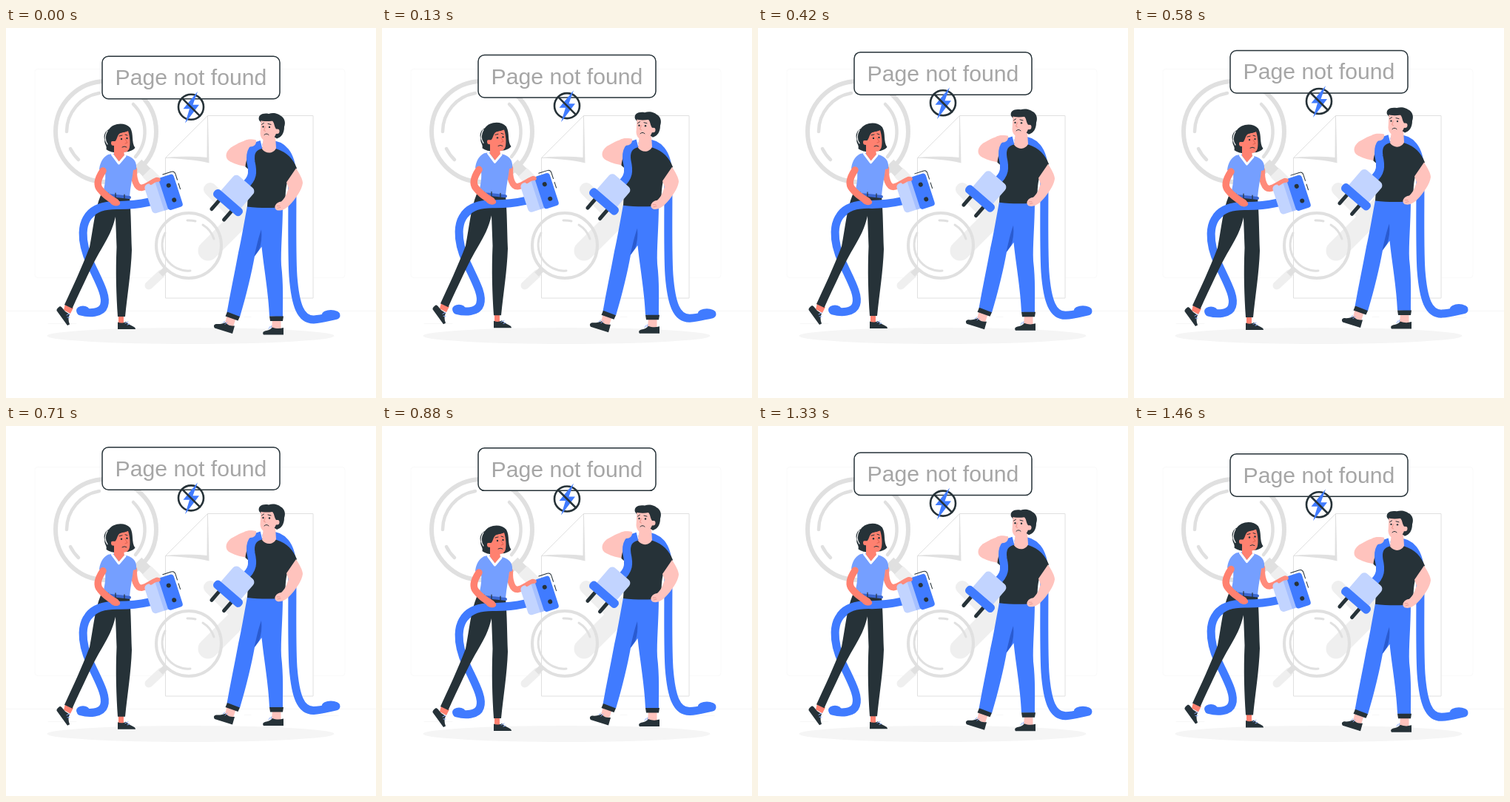
An HTML page for the animation above (1500 ms loop, 500 by 500 pixels).

```html
<!DOCTYPE html>
<html lang="en">
<head>
<meta charset="utf-8">
<title>Page not found</title>
<style>
  html, body { margin: 0; height: 100%; overflow: hidden; background: #fff; }
  svg { display: block; width: 100%; height: 100%; }
  .line { fill: none; stroke-linecap: round; stroke-linejoin: round; }
  .blue { fill: #407bff; }
  .dark { fill: #263238; }
  .cable { stroke: #407bff; stroke-width: 11; }
  .ink { stroke: #263238; }
  .grey { stroke: #e0e0e0; }
  .pale { stroke: #efefef; }
  .tan { fill: #ff8170; }
  .pink { fill: #ffc3bd; }
</style>
</head>
<body>
<svg viewBox="0 0 500 500">
  <!-- backdrop -->
  <g class="line">
    <rect x="39" y="55.5" width="419" height="282" rx="4" stroke="#fafafa"/>
    <path d="M0 382.5H500" stroke="#f6f6f6"/>
    <path d="M416 391.5h33M57 399.5h38M322 390.5h9" stroke="#f7f7f7"/>
    <path class="pale" stroke-width="17" d="M192 197L240 245"/>
    <path class="grey" stroke-width="15" stroke-linecap="butt" d="M178 183L190 195"/>
    <g class="grey">
      <circle cx="135" cy="140" r="68" stroke-width="6"/>
      <path stroke-width="4.500" d="M82 140A53 53 0 0 1 126 88M87 163A53 53 0 0 0 98 178M172 103A52 52 0 0 1 175 174"/>
    </g>
  </g>
  <path class="grey" fill="#fff" d="M272.500 118.500H415V365H215.500V175.500Z"/>
  <path fill="#e0e0e0" d="M273 122L274.500 182.500C258 178 236 177 215.500 175.500Z"/>
  <path class="grey" fill="#fff" d="M272.500 118.500L272 175.500C252 173.500 234 174 215.500 175.500Z"/>
  <g class="line pale">
    <path stroke-width="18" d="M276 218L308 250"/>
    <path stroke-width="27" d="M273 301L335 239"/>
    <path stroke-width="11" d="M210 332L193 348"/>
  </g>
  <g class="line grey">
    <path stroke-width="8" stroke-linecap="butt" d="M217 325L209 333"/>
    <circle cx="247" cy="294" r="44" stroke-width="4"/>
    <path stroke-width="3" d="M215 277A35 35 0 0 0 249 328M245 260A35 35 0 0 1 256 261M266 266A35 35 0 0 1 281 285"/>
  </g>
  <ellipse cx="249.500" cy="416" rx="194" ry="11" fill="#f5f5f5"/>

  <g id="woman">
    <path class="line cable" d="M122 246C97 258 102 292 114 318C125 342 137 362 132.500 375C129 386 112 386 101 383"/>
    <ellipse class="blue" cx="104" cy="381.500" rx="9" ry="6"/>
    <path class="tan" d="M80 373L91 378L87 386L78 381ZM152 388H159V400H152Z"/>
    <path class="dark" d="M73 376C70 378 68 380 68.500 382L83 402L86 400.500C84 395 84 391 86 387L80 383C77 380 76 377 73 376Z"/>
    <path class="dark" d="M151 397.500V407H175C175 403 168 403 162 397C158 399 154 399 151 397.500Z"/>
    <path class="line" stroke="#8fb0ff" d="M82 388l4-2M83 391l3 0M161 399l4-2M164 401l3-1"/>
    <path class="dark" d="M128 226L167 228C169 250 169 275 170 300C169 330 164 360 161 390H151C149 360 148 330 149.500 296L148 255C144 272 138 283 131 295C123 308 116 322 109 337C103 350 96 364 89.500 379L79 374C90 350 102 325 113 296C118 270 120 245 128 226Z"/>
    <path class="line" stroke="#ff8b7b" stroke-width="8.500" d="M173 191C172 204 176 216 183 216C190 215 195 210 204 206"/>
    <path fill="#759fff" d="M138 171C130 175 127 183 126 191L134 195C135 205 133 215 131 223L167 228C168 214 171 202 172 192L176 191C177 182 174 175 162 172L150 169Z"/>
    <path class="line" stroke="#3a66d0" stroke-width="4" stroke-linecap="butt" d="M131 225L167 229"/>
    <path class="line ink" stroke-width="1.200" d="M138 223v5M148 223v6M160 225v5"/>
    <path class="line cable" d="M112 253C122 240 142 239 154 239.500C170 239.500 180 238 194 235"/>
    <path class="line" stroke="#ff8170" stroke-width="9.500" d="M131 193C125 202 121 211 127 218C133 226 141 231 148 235"/>
    <ellipse class="tan" cx="147.500" cy="235.500" rx="7" ry="4.500" transform="rotate(15 147 235)"/>

    <path class="dark" d="M139 137C144 129 160 126 168 135C173 144 169 154 174.500 162C171 166 165 168 159 167L148 168.500C143 168 138 166 135.500 164C137 159 132 156 133.500 151C131 146 134 139 139 137Z"/>
    <path class="tan" d="M146 156V172L153 181L160 173L159 164Z"/>
    <path class="line" stroke="#fff" stroke-width="3" d="M143.500 171L152.500 183L161 173"/>
    <path class="tan" d="M148 144C153 142 160 140 165 139C167.500 147 168 156 167 161C166 167 161 169 157 167.500C151 165 148 161 147 157Z"/>
    <circle class="tan" cx="145.500" cy="155.500" r="3.500"/>
    <path class="dark" d="M140 139C146 130 160 128 168 136C164 142 157 140 153 143C150 146 150 151 147.500 153L142 153Z"/>
    <path class="line" stroke="#fff" stroke-width="1.200" d="M137 139C133.500 145 133.500 152 137 157"/>
    <path class="line ink" stroke-width="1" d="M153 146l4-1M161 144l3 1M157 161q3-2 6 0"/>
    <path class="line" stroke="#e0604f" stroke-width="1" d="M161 150l3 5l-3 1"/>
    <circle class="dark" cx="156" cy="150" r="1.200"/>
    <circle class="dark" cx="163.500" cy="149" r="1.200"/>

    <g transform="translate(222.700 221.800) rotate(-18)">
      <rect x="-32" y="-20" width="26" height="41" rx="5" fill="#c2d4ff"/>
      <rect x="-16" y="-20" width="8" height="41" fill="#a6c0ff"/>
      <rect class="blue" x="-10.500" y="-23" width="21" height="46" rx="4"/>
      <circle class="dark" cx="0" cy="-9.500" r="3"/>
      <circle class="dark" cx="1" cy="11.500" r="3"/>
      <path class="line ink" d="M-3 -26H9Q13.500 -26 13.500 -21.500V-13M13.500 -8V0"/>
    </g>
    <path class="line" stroke="#ff8b7b" stroke-width="5.500" d="M196 209C200 206 203 205 206 205"/>
  </g>

  <g id="man">
    <path class="line cable" d="M352 157C374 155 386 170 387 200C387 260 386 305 388 335C391 374 398 394 416 393.500C428 393 435 390 446 388"/>
    <ellipse class="blue" cx="439" cy="386.500" rx="12" ry="6"/>
    <path class="pink" d="M299 386L311 391L307 403L296 399ZM360 393H371.500V406H359Z"/>
    <path class="dark" d="M309 402L306 412.500L282 405C280 402 281 400 284 399.500C289 400 293 399 297 397.500C300 402 305 402 309 402Z"/>
    <path class="dark" d="M375 404.500V414H348C346 411 348 409 352 408.500C356 408 358 406 360 404C365 406 370 406 375 404.500Z"/>
    <path class="line" stroke="#8fb0ff" d="M293 398l3-2M296 400l3-3M355 406l2-3M358 405l1-3"/>
    <path class="blue" d="M326 240H374C374 270 371 300 372 320C375 345 374 368 374 390L356 389C355 360 348 320 345.500 295L336 308C332 330 325 360 316 390L298.500 384C303 358 309 330 314 303C318 285 322 262 326 240Z"/>
    <path fill="#2a5bd0" d="M345 272C341 283 339 293 335.500 308L342 299C345 291 346 282 345 272Z"/>
    <path class="dark" d="M299 383L316 389.500L313.500 395L296.500 389ZM356 389H375L374 395.500H357Z"/>
    <path class="pink" d="M338 151C328 148 316 154 304 161C296 167 295 176 303 180C311 184 319 186 327 187L340 172Z"/>
    <path class="dark" d="M334 164C327 171 324 179 323.500 187L327 190C328 207 327 225 326 241C344 243 362 243 378 241C377 226 378 216 380 208L393 189C388 176 380 168 366 163L350 160Z"/>
    <path class="pink" d="M392 189C397 197 401 204 401 209C400 218 391 231 382 240C377 245 369 248 365 245C361 241 365 235 372 234C377 230 380 222 382 216L379 208Z"/>
    <path class="line" stroke="#e99c94" d="M366 240l4 0M367 243l4-1"/>
    <path class="pink" d="M348 146L346 163C351 170 361 170 365 162L364 146Z"/>
    <path class="line cable" stroke-linecap="butt" style="stroke-linecap:butt" d="M322 213C334 203 334 194 331 181C329 168 333 160 345 157"/>
    <path class="pink" d="M322 152C328 149 335 150 338 153C338 157 335 160 330 160L320 161Z"/>

    <path class="dark" d="M342 124C340 117 347 114 355 115.500C362 113 369 116 371 118C377 121 378 128 376 133C376 142 372 147 366 149L356 142Z"/>
    <path class="pink" d="M344.500 124C344 130 344 137 343.500 142C344 149 348 152.500 354 152C361 151 365 145 366 138L363 125Z"/>
    <circle class="pink" cx="366" cy="139" r="3.500"/>
    <path class="dark" d="M342 124C341 117 348 114.500 355 116.500C364 113 373 120 374 130L369 136L365 136C362 132 363 128 360 125C354 126 347 126 342 124Z"/>
    <path class="line ink" d="M345.500 130l3-2M354 129l4 1M349 144q3-3 6 0"/>
    <path class="line" stroke="#e9938a" d="M350.500 133l-2 5l2 1"/>
    <circle class="dark" cx="347.500" cy="133" r="1.200"/>
    <circle class="dark" cx="356" cy="133.500" r="1.200"/>

    <g transform="translate(300 235.700) rotate(41)">
      <path class="line ink" stroke-width="5" d="M-11 4V21M11 4V21"/>
      <rect x="-18" y="-37" width="36" height="36" rx="6" fill="#c2d4ff"/>
      <rect class="blue" x="-24" y="-6" width="48" height="12" rx="5"/>
    </g>
  </g>

  <g id="sign">
    <rect class="ink" x="130" y="37.800" width="240" height="57.500" rx="8.500" fill="#fff" stroke-width="1.500"/>
    <text x="250" y="76.800" text-anchor="middle" font-family="'Liberation Sans', Arial, sans-serif" font-size="30.200" fill="#a6a6a6">Page not found</text>
    <g transform="translate(0 .4)">
      <circle class="line ink" cx="250" cy="106" r="17" stroke-width="2.600"/>
      <path class="blue" d="M259 85L239.500 108.500H248L242 128L261 103H252.500Z"/>
      <path class="line ink" stroke-width="2.600" d="M238 94L262 118"/>
    </g>
  </g>
</svg>
<script>
  const LOOP = 1500, STEPS = 36, LIFT = 10, BASE = 0.4;
  const [woman, man, sign] = ["woman", "man", "sign"].map(id => document.getElementById(id));

  // Linear rise and fall, 0 to 1 to 0 over one loop
  const rise = phase => 1 - Math.abs(2 * (phase % 1) - 1);
  const shift = (part, y) => part.setAttribute("transform", `translate(0 ${y.toFixed(3)})`);

  function draw() {
    // 24 poses per second, with starts rounded to 10 ms
    const phase = Math.floor((performance.now() + 5) * STEPS / LOOP) % STEPS / STEPS;
    const y = BASE - LIFT * rise(phase);
    shift(man, y);
    shift(sign, y);
    shift(woman, LIFT * (rise(1 / 3) - rise(phase + 1 / 3)));
    requestAnimationFrame(draw);
  }
  draw();
</script>
</body>
</html>
```
